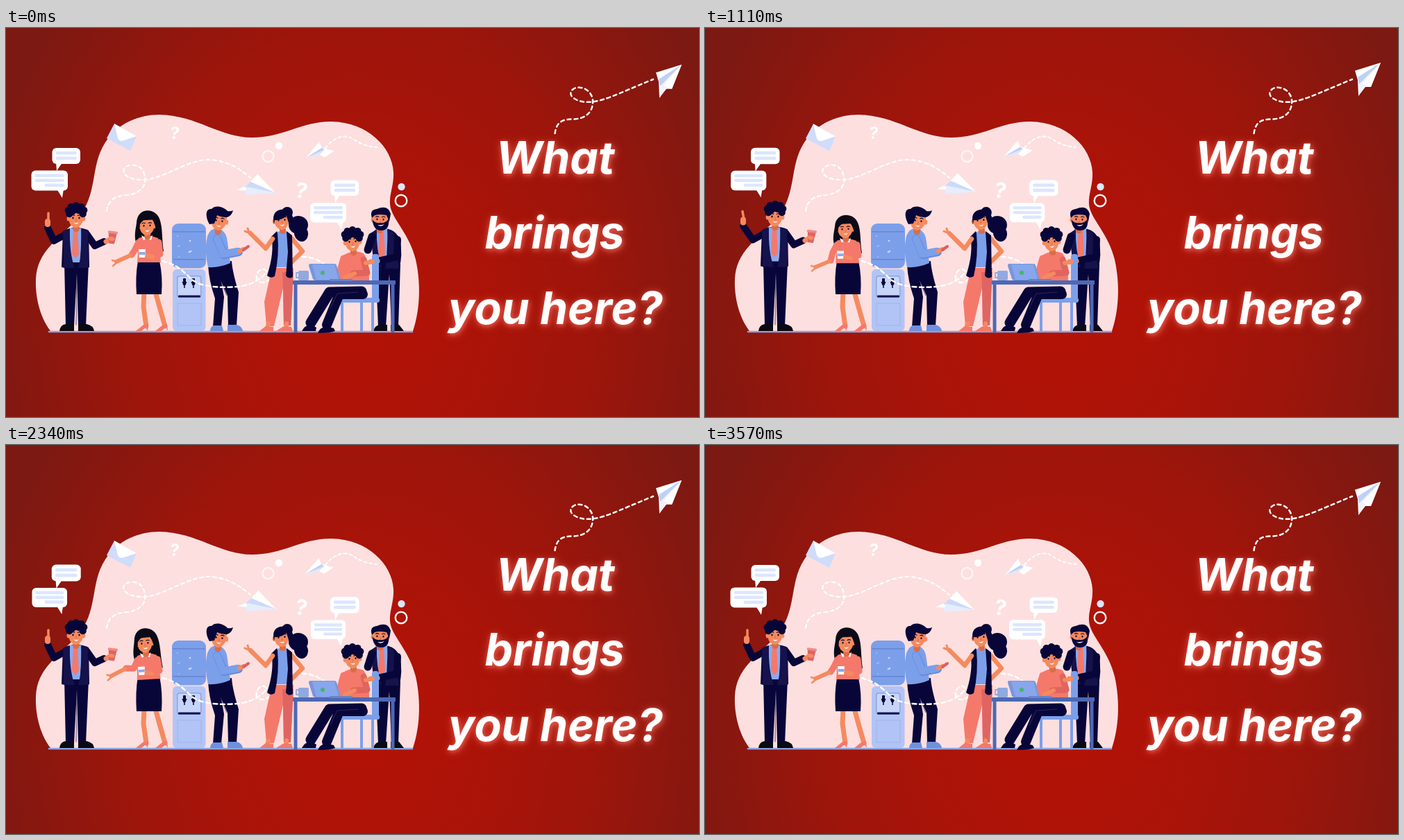
An HTML page with a canvas for the animation above (3.6 s loop, 998 px wide and 561 px high).

```html
<!DOCTYPE html>
<html lang="en">
<head>
<meta charset="utf-8">
<style>
  html, body { margin: 0; width: 998px; height: 561px; overflow: hidden; background: #a5140a; }
  canvas, svg { position: absolute; left: 0; top: 0; }
  text {
    font: italic 650 64.3px Inter, "Open Sans", sans-serif;
    font-feature-settings: "cv11";
    fill: #fff;
    text-anchor: middle;
    text-shadow: 1px 2px 6px rgba(255, 130, 115, .55), 1px 2px 14px rgba(255, 110, 95, .6);
  }
</style>
</head>
<body>
<canvas id="stage" width="998" height="561"></canvas>
<svg width="998" height="561">
  <text x="791" y="209.500">What</text>
  <text x="790" y="318">brings</text>
  <text x="791" y="427">you here?</text>
</svg>
<script>
const ctx = document.getElementById('stage').getContext('2d');
const LOOP = 3600, STEP = 30;
const NAVY = '#080638', INK = '#15124c', SKIN = '#f58a5f', TAN = '#d96d48', CORAL = '#f4796b',
      BLUE = '#7c9fea', PALE = '#b2c4f5', ICE = '#dce6fd', DESK = '#4d68b4', WHITE = '#fff', SHOE = '#0a0a14';

// Drawing helpers
function fill(d, color) {
  ctx.fillStyle = color;
  ctx.fill(new Path2D(d));
}
function line(d, color, width, dash = []) {
  ctx.strokeStyle = color;
  ctx.lineWidth = width;
  ctx.lineCap = ctx.lineJoin = 'round';
  ctx.setLineDash(dash);
  ctx.stroke(new Path2D(d));
}
function oval(x, y, rx, ry, color, turn = 0) {
  ctx.fillStyle = color;
  ctx.beginPath();
  ctx.ellipse(x, y, rx, ry, turn, 0, 7);
  ctx.fill();
}
function box(x, y, w, h, r, color) {
  ctx.fillStyle = color;
  ctx.beginPath();
  ctx.roundRect(x, y, w, h, r);
  ctx.fill();
}
function posed(x, y, { dx = 0, dy = 0, turn = 0, sx = 1, sy = sx }, draw) {
  ctx.save();
  ctx.translate(x + dx, y + dy);
  ctx.rotate(turn);
  ctx.scale(sx, sy);
  ctx.translate(-x, -y);
  draw();
  ctx.restore();
}

// Motion helpers
const wave = (t, period, peak) => (1 + Math.cos(2 * Math.PI * (t / period - peak))) / 2;
const bump = (t, center, width) => Math.exp(-(((t - center) / width) ** 2));
const ease = (t, a, b) => {
  const k = Math.min(1, Math.max(0, (t - a) / (b - a)));
  return k * k * (3 - 2 * k);
};

function background() {
  ctx.save();
  ctx.translate(510, 405);
  ctx.scale(545, 660);
  const g = ctx.createRadialGradient(0, 0, 0, 0, 0, 1.04);
  g.addColorStop(0, '#b41205');
  g.addColorStop(.3, '#ac1308');
  g.addColorStop(.6, '#9d150b');
  g.addColorStop(1, '#7b1912');
  ctx.fillStyle = g;
  ctx.fillRect(-2, -2, 4, 4);
  ctx.restore();
}

function backdrop() {
  fill('M64 437C47 414 42 384 43 362C45 322 74 306 101 277C134 241 120 200 143 165C161 137 192 125 221 125C275 126 308 158 354 158C399 158 428 134 469 135C521 136 556 172 558 208C559 229 550 242 554 260C560 280 581 298 590 334C598 370 596 408 586 437Z', '#fddfdf');
  line('M145 264C147 250 155 242 174 241C199 238 204 222 198 208C193 195 175 195 170 203C166 212 180 219 195 219C225 220 262 188 295 190C322 192 340 206 352 216', WHITE, 2.2, [5, 4.5]);
  line('M460 173C472 158 487 152 500 160C514 170 525 171 534 172', WHITE, 2, [4, 4]);
  for (const [x, y, r] of [[377.5, 185, 8], [569, 249, 8.3]])
    line(`M${x - r} ${y}a${r} ${r} 0 1 0 ${2 * r} 0a${r} ${r} 0 1 0 ${-2 * r} 0`, '#fff4f4', 2.4);
  oval(393, 170, 5.2, 5.2, WHITE);
  oval(569.5, 229, 5.2, 5.2, ICE);
}

function question(x, y, size, turn) {
  posed(x, y, { turn }, () => {
    ctx.font = `700 ${size}px Inter, sans-serif`;
    ctx.textAlign = 'center';
    ctx.textBaseline = 'middle';
    ctx.fillStyle = WHITE;
    ctx.fillText('?', x, y);
  });
}

function bubble(x, y, w, h, tail, sx) {
  posed(x + w / 2, y + h / 2, { sx }, () => {
    box(x, y, w, h, 6, WHITE);
    fill(tail, WHITE);
    const rows = h > 25 ? 3 : 2, pitch = (h - 8) / rows;
    for (let i = 0; i < rows; i++)
      box(x + 5 + (i === 2 ? 14 : 0), y + 5 + i * pitch, w - 10 - (i === 2 ? 14 : 0), 4.5, 2, ICE);
  });
}

function floaters(t) {
  const swell = wave(t, 900, .46), glide = wave(t, 900, .38), sway = wave(t, 1200, .5);
  const grow = 1 + .045 * swell, shrink = 1 - .045 * swell;
  bubble(66.5, 173, 40.5, 23, 'M72 193H82L73 206Z', grow);
  bubble(36.5, 205.5, 52.5, 29, 'M73 232H83L81 245Z', shrink);
  bubble(467.5, 219.5, 40.5, 22.5, 'M473 239H482L474 252Z', grow);
  bubble(438, 252, 52, 28.5, 'M476 278H486L483 291Z', shrink);

  posed(166, 157, { dy: 4 * sway, turn: -.04 * sway }, () => {
    fill('M156 138L188 156L179 177L145 159Z', '#cfdcfa');
    fill('M156 138L188 156L167 163Q163 163 161 159Z', WHITE);
  });
  question(243, 152.5, 24, .08);
  question(425, 236 - 4 * sway, 31, .2 - .2 * sway);

  posed(360, 228, { dx: 2.3 * glide, dy: -2.3 * glide }, () => {
    fill('M362 211L388 238L332 234L347 227Z', WHITE);
    fill('M352 222L388 238L343 230Z', '#cbdaf9');
    fill('M346 229L388 238L344 241Z', '#e6edfd');
  });
  posed(452, 177, { dx: -1.5 * glide, dy: -2 * glide, turn: .06 * glide }, () => {
    fill('M432 188L451 164L455 173L473 177L459 187L452 183Z', WHITE);
    fill('M432 188L455 173L459 176Z', '#bed0f7');
    fill('M432 188L459 176L452 183Z', ICE);
  });

  line('M790.5 152C793 134 803 132 814 131.500C838 132 846 118 845 104C843 88 826 82 817 88C808 95 816 104 832 106.500C856 109 880 95 932 74', WHITE, 2.5, [5, 4.8]);
  posed(954, 77, { dy: .4 - 4.3 * glide }, () => {
    fill('M973 53L936 64.500L940 78L941 101L951 88L959 88Z', WHITE);
    fill('M973 53L940 74L942 84L948 79Z', '#bfd0f7');
    fill('M973 53L943 83L941 101Z', '#eef3fe');
    fill('M973 53L947 83L959 88Z', WHITE);
  });
}

// Face with brows, eyes, nose and smile; the hair is drawn around it by the caller
function face(x, y, skin, turn = 0) {
  posed(x, y, { turn }, () => {
    box(x - 4.5, y + 6, 9, 14, 4, TAN);
    fill(`M${x - 10.5} ${y - 8}h21q1 12 -3 17q-4 5 -8 5q-4 0 -8 -5q-3 -5 -2 -17Z`, skin);
    oval(x - 11, y + 1, 2.4, 3.5, skin);
    oval(x + 11, y + 1, 2.4, 3.5, skin);
    for (const e of [-4.5, 4.5]) {
      oval(x + e, y, 1.1, 1.4, NAVY);
      line(`M${x + e - 2.2} ${y - 3.5}q2.2 -1.4 4.4 0`, NAVY, 1.1);
    }
    line(`M${x} ${y + 1}l.8 3h-1.6`, TAN, .9);
    fill(`M${x - 3.6} ${y + 6.5}q3.6 1.5 7.2 0q-3 4.500 -7.2 0`, WHITE);
  });
}
function curls(x, y, color) {
  for (let i = 0; i < 7; i++) {
    const a = Math.PI * (1.06 - .24 + i * .226);
    oval(x + 11.5 * Math.cos(a), y + 8 * Math.sin(a), 5, 5, color);
  }
  oval(x, y - 4, 11, 7, color);
  oval(x - 6, y + 2, 5, 4, color);
  oval(x + 4, y, 5, 4, color);
}
function suit(x) {
  fill(`M${x - 9} 289L${x + 9} 289L${x + 7} 338H${x - 7}Z`, '#8baaf0');
  fill(`M${x - 3} 290h6l2 36l-5 6l-5 -6Z`, CORAL);
}

function speaker(t) {
  const raise = bump(t, 1110, 170), dip = bump(t, 3000, 170);
  fill('M84 338H119L115 430H104L102 355L98 430H86Z', NAVY);
  line('M102 355L101 428', '#2a2866', .8);
  fill('M77 437Q78 428 86 427H98V437Z', SHOE);
  fill('M104 437V427H116Q126 429 127 437Z', SHOE);

  ctx.save();
  ctx.translate(0, -1.5 * raise + dip);
  const hx = 60 - 5 * raise, hy = 284 - raise;
  line(`M87 297L69 307L${hx} ${hy + 4}`, NAVY, 10);
  line(`M${hx} ${hy - 1}v-4`, SKIN, 8);
  line(`M${hx + 1} ${hy - 6}L${hx + 1 - 2 * raise} ${hy - 17}`, SKIN, 3.5);
  line('M116 297L128 314L141 308', NAVY, 10);
  line('M144 308L151 304', SKIN, 7);
  posed(153, 302, { turn: .12 }, () => {
    fill('M147 295H159L157 311H149Z', '#dc6469');
    box(146, 293, 14, 3.5, 1, '#f18b83');
    oval(152, 304, 5, 3, SKIN);
  });
  fill('M82 293Q91 288 101 288Q111 288 119 292L120 345Q101 350 80 345Z', NAVY);
  suit(100);
  fill('M92 289L82 293L83 346H99Q91 325 92 289Z', INK);
  fill('M108 289L118 293L119 346H104Q110 325 108 289Z', INK);
  ctx.restore();

  ctx.save();
  ctx.translate(0, -2 * raise + 3 * dip);
  face(101, 274, SKIN);
  curls(101, 264, NAVY);
  ctx.restore();
}

function greeter(t) {
  const low = bump(t, 1110, 260) + bump(t, 3000, 260);
  const lean = ease(t, 1200, 1500) - ease(t, 2500, 2850);
  line('M199 380L198 402L202 430', SKIN, 7);
  line('M215 380L221 402L229 430', SKIN, 7);
  fill('M187 437L198 428L205 427L204 437L201 432L195 437Z', CORAL);
  fill('M215 437L226 428L232 427L233 437L230 432L224 437Z', CORAL);
  fill(`M190 ${336 - 3 * lean}H221Q226 358 224 384H188Q186 358 190 ${336 - 3 * lean}Z`, NAVY);

  posed(206, 342, { dx: -low, dy: low, turn: -.055 * lean, sx: 1, sy: 1 - .07 * low - .01 * lean }, () => {
    fill('M188 281C189 258 215 259 221 275C226 288 224 302 227 322L213 328L189 314C183 302 187 290 188 281Z', '#0c0a18');
    fill('M191 303Q205 297 219 303L223 338H189Q191 318 188 310Z', CORAL);
    const hx = 156 + low - 7 * lean, hy = 337 + 7 * low - 7 * lean;
    line(`M191 309L185 321L${hx + 25} ${hy - 10}`, CORAL, 9);
    line(`M${hx + 23} ${hy - 9}L${hx + 3} ${hy}`, SKIN, 6);
    line(`M${hx + 5} ${hy}l-8 -2M${hx + 4} ${hy + 1}l-6 5`, SKIN, 2.5);
    fill('M195 299Q203 305 211 299L209 306L203 303L198 306Z', WHITE);
    face(203, 285, SKIN, -.05);
    fill('M188 295C186 262 213 258 220 277L220 303C215 295 217 281 207 272Q196 277 193 283L192 297Z', '#0c0a18');
    line('M220 309L222 326L211 330', CORAL, 9);
    line('M211 330L199 327', SKIN, 6);
    fill('M191 319H201L200 331H192Z', WHITE);
    fill('M191.500 323H200.700L200.200 327H192Z', '#8baaf0');
  });
}

function cooler() {
  box(240, 348, 47.5, 89, 6, PALE);
  box(239, 282, 49, 64.5, 9, BLUE);
  for (const y of [293, 333]) box(240, y, 47, 1.5, 1, '#6686d4');
  for (let i = 0; i < 7; i++)
    oval(247 + (i * 17) % 33, 300 + (i * 23) % 31, .8 + i % 2 * .5, .8 + i % 2 * .5, '#cbd9fb');
  box(246, 357, 35.5, 32, 4, '#8ba6e8');
  box(247.5, 358.5, 32.5, 29, 3, '#c6d4f8');
  for (const x of [257, 270]) {
    box(x - 2, 361, 4, 6, 1, NAVY);
    fill(`M${x - 3.5} 366h7l-2 5h-.8v4h-1.500v-4h-.8Z`, NAVY);
  }
  box(248, 385.500, 32, 3, 1, INK);
  line('M247 397H281V429H247Z', '#a2b6ec', 1.2);
}
function lowTrail() {
  line('M225 336C247 341 256 352 268 363C281 374 312 375 333 373C355 371 371 360 375 351C371 343 359 350 361 362C375 383 400 333 422 330C447 328 461 342 475 355', WHITE, 2.4, [6, 4.5]);
}

function phoneMan(t) {
  const lift = bump(t % 1200, 330, 85);
  fill('M291 341L325 336Q326 352 335 381L332 430H320L319 386L310 366L314 388L310 431H298L301 390Q292 364 291 341Z', NAVY);
  line('M309 365L318 386', '#302e6b', .8);
  fill('M294 437Q294 431 299 429H311L313 437Z', '#6d91dd');
  fill('M319 437V428H332Q340 430 341 437Z', '#6d91dd');
  fill('M290 300Q295 287 307 289Q318 294 319 309L323 339Q307 346 291 345Q285 320 290 300Z', BLUE);
  line(`M304 304L314 327L${335 + lift} ${323 - 3 * lift}`, '#6489dc', 12);
  line(`M304 304L313 326L${334 + lift} ${322 - 3 * lift}`, BLUE, 10.5);
  const px = 343 + 3 * lift, py = 320 - 6 * lift;
  line(`M${px - 7} ${py + 2}L${px - 1} ${py - 1}`, SKIN, 6);
  line(`M${px - 1} ${py}L${px + 6} ${py - 5}`, '#dc5e62', 4);
  face(307, 278, SKIN, .12);
  fill('M293 283C286 270 288 260 296 261C301 255 313 257 319 264Q323 265 327 263Q325 271 318 273Q310 273 304 270L300 282Z', NAVY);
}

function gesturingWoman(t) {
  const bow = wave(t, 1200, .5);
  fill('M383 346H414L410 429H400L399 375L386 430H375L372 395Z', CORAL);
  fill('M398 352H414L410 429H400L399 375Z', '#df6562');
  line('M378 426L376 433M404 426V433', SKIN, 6);
  fill('M365 437L374 430L385 431V437Z', CORAL);
  fill('M389 437L400 430L411 431L413 437Z', CORAL);
  line('M412 304L427 322L411 338', SKIN, 6.5);
  posed(398, 350, { dy: .5 * bow, turn: -.008 * bow }, () => {
    fill('M386 297Q397 289 409 296L408 345H387Z', BLUE);
    fill('M390 293L382 301Q387 323 376 357Q381 362 387 358Q394 328 391 296Z', NAVY);
    fill('M404 293L412 299L413 359Q407 363 403 357L406 323Z', NAVY);
    line(`M384 304L374 ${318 + bow}L352 ${296 + 3 * bow}`, SKIN, 6.5);
    line(`M352 ${296 + 3 * bow}L344 ${293 + 3 * bow}M350 ${295 + 3 * bow}L348 ${289 + 3 * bow}`, SKIN, 3);
  });
  posed(398, 292, { dx: -.5 * bow, dy: 2.5 * bow, turn: -.06 * bow }, () => {
    oval(421, 284, 14, 13, NAVY);
    oval(425, 296, 10, 12, NAVY, -.25);
    oval(405, 266, 8, 8, NAVY);
    face(397, 277, SKIN, -.1);
    fill('M386 283Q382 265 395 262Q409 259 413 272L413 287Q409 287 407 281L404 271Q396 278 387 277Z', NAVY);
  });
}

function beardedMan() {
  fill('M532 340H568L565 431H555L552 355L547 431H536Z', NAVY);
  fill('M529 437Q531 429 538 428H549V437Z', SHOE);
  fill('M554 437V428H566L573 437Z', SHOE);
  fill('M526 296Q537 288 547 289Q563 292 567 306Q572 326 566 348H531Z', NAVY);
  suit(541);
  fill('M534 290L525 296L530 345H541Q533 320 534 290Z', INK);
  fill('M549 290L558 295L566 347H546Q552 321 549 290Z', INK);
  line('M527 301L521 320', NAVY, 11);
  line('M564 305L563 330L536 336', NAVY, 10);
  line('M535 336L525 337', SKIN, 7);
  face(539, 276, SKIN, .05);
  fill('M527.500 276Q531 282 539 281Q547 282 551 275Q553 292 540 292Q529 292 527.500 276Z', NAVY);
  fill('M535 284Q540 285 545 283Q540 288 535 284Z', WHITE);
  fill('M527 274Q523 262 534 261Q550 254 554 268L552 279L548 270Q538 268 531 270Z', NAVY);
}

function seatedMan() {
  box(527, 326, 10, 68, 4, BLUE);
  box(480, 389, 58, 7, 3, BLUE);
  line('M484 396V436M528 396V436M512 396V436', BLUE, 4);
  line('M512 380L466 381L439 425', NAVY, 15);
  line('M514 384L480 384L462 428', NAVY, 14);
  line('M507 381L477 383L467 404', '#302e6b', .8);
  fill('M426 437Q430 429 439 427L447 432L446 437Z', NAVY);
  fill('M449 440Q452 432 461 430L472 433L474 437Q468 440 449 440Z', NAVY);
  fill('M484 329Q500 318 515 325Q523 337 523 365H480Q478 347 484 329Z', CORAL);
  line('M515 334L520 353L500 354', '#e0655d', 9);
  line('M486 332L481 350L491 360', CORAL, 9);
  line('M502 354L488 360', SKIN, 6);
  line('M528 337L518 339', SKIN, 6);
  face(499, 308, SKIN, -.1);
  curls(499, 299, NAVY);
}

function desk() {
  box(413, 364, 148, 6, 1, DESK);
  line('M417 370V437M557 370V437', DESK, 5);
  box(421, 350, 15, 14, 2, '#91a9df');
  line('M421 353h-3v7h3', '#91a9df', 1.8);
  fill('M438 340H473Q475 340 476 342L482 364H446Q443 364 442 362L436 343Q436 340 438 340Z', '#7896dd');
  fill('M441 341H473L479 363H447Z', '#87a6ec');
  box(466, 362, 33, 3, 1, '#6683cc');
  oval(456, 353, 3, 3, '#43b66a');
}

function draw(t) {
  background();
  backdrop();
  line('M62 438H585', '#8ca4df', 2.6);
  floaters(t);
  cooler();
  speaker(t);
  greeter(t);
  phoneMan(t);
  lowTrail();
  gesturingWoman(t);
  beardedMan();
  seatedMan();
  desk();
}

const start = performance.now();
function tick() {
  const t = (performance.now() - start) % LOOP;
  draw(Math.floor(t / STEP) * STEP);
  requestAnimationFrame(tick);
}
tick();
</script>
</body>
</html>
```
